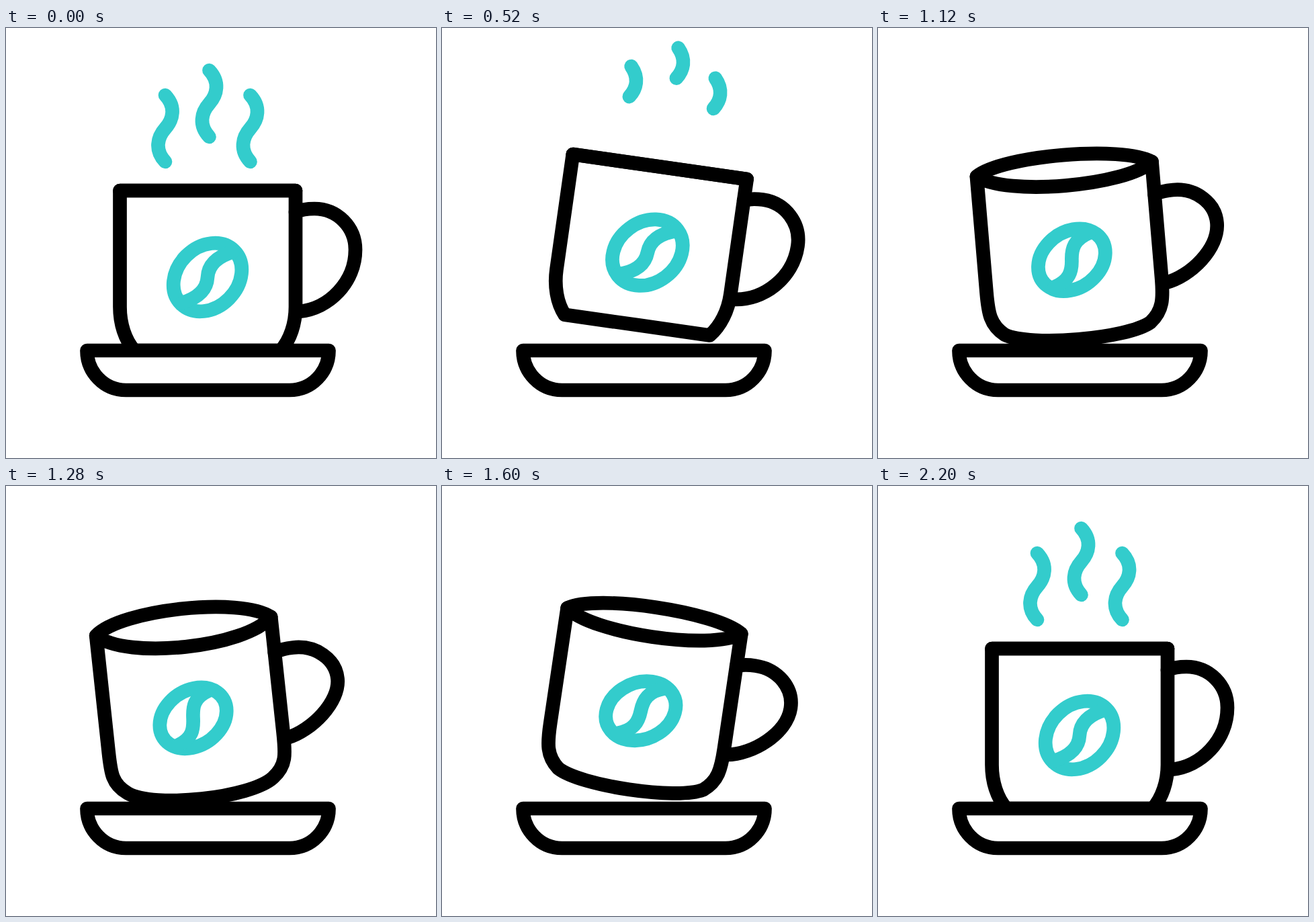
Animation, 640 px wide and 640 px high, one loop 2.4 s. Source, as an HTML page:

```html
<!DOCTYPE html>
<html lang="en">
<head>
<meta charset="utf-8">
<title>Coffee cup</title>
<style>
  html, body { margin: 0; width: 100%; height: 100%; overflow: hidden; background: #fff; }
  svg { display: block; width: 640px; height: 640px; }
  path, ellipse { fill: none; stroke: #000; stroke-width: 20.7; stroke-linecap: round; stroke-linejoin: round; }
  .teal { stroke: #3cc; }
  #squash * { vector-effect: non-scaling-stroke; }
  #saucer { fill: #fff; }
</style>
</head>
<body>
<svg viewBox="0 0 640 640">
  <clipPath id="above"><rect id="limit" width="640" height="640"/></clipPath>
  <g clip-path="url(#above)"><g id="steam"></g></g>
  <g id="cup">
    <g id="squash">
      <path id="handle"/>
      <ellipse class="teal" cx="300" cy="371" rx="56" ry="45" transform="rotate(-45 300 371)"/>
      <path id="crease" class="teal"/>
    </g>
    <path id="body"/>
    <path id="rim"/>
  </g>
  <path id="saucer" d="M120.5 480H480.5C480.5 512 455 539 422 539H178.5C146 539 120.5 512 120.5 480Z"/>
</svg>
<script>
const LOOP = 2400;
// time, rim centre x, rim centre y, tilt, rim depth, hop height on the way here
const POSES = [
  [200, 300, 242, 0, 0, 0],
  [500, 323.7, 206.7, 8.1, 0, 0],
  [830, 350.2, 206.2, 6.97, 0, 6],
  [1240, 258.2, 211, -7.85, 31, 0],
  [1480, 331.9, 182.9, 14.56, 27.8, 0],
  [1790, 284.2, 235.7, -3.5, 16.3, 0],
  [2200, 300, 242, 0, 0, 0]
];
const $ = id => document.getElementById(id);
const setPath = (id, d) => $(id).setAttribute("d", d);

const ease = (t, from, to) => {
  const u = Math.min(1, Math.max(0, (t - from) / (to - from)));
  return u * u * (3 - 2 * u);
};

const wisps = [[237, 100], [302.5, 63], [363.5, 100]].map(([x, y]) => {
  const p = document.createElementNS("http://www.w3.org/2000/svg", "path");
  p.setAttribute("class", "teal");
  p.setAttribute("pathLength", 1);
  p.setAttribute("d", `M${x} ${y}c16 17 12 36 0 49.5c-12 13.5 -16 32.5 0 49.5`);
  return $("steam").appendChild(p);
});

function poseAt(t) {
  let i = 1;
  while (i < POSES.length - 1 && t > POSES[i][0]) i++;
  const a = POSES[i - 1], b = POSES[i];
  const k = ease(t, a[0], b[0]);
  const [, x, y, tilt, depth] = a.map((v, n) => v + (b[n] - v) * k);
  return { x, y: y - b[5] * Math.sin(Math.PI * k), tilt, depth };
}

function drawCup({ x, y, tilt, depth }) {
  const move = `translate(${x} ${y}) rotate(${tilt}) translate(-300 -242)`;
  $("cup").setAttribute("transform", move);
  $("steam").setAttribute("transform", move);
  $("squash").setAttribute("transform", `translate(0 434) scale(1 ${1 - 0.0043 * depth}) translate(0 -434)`);

  // The deeper the rim, the rounder the cup and the steeper the crease.
  const front = 242 + depth * 4 / 3;
  const back = 242 - depth * 0.85 * 4 / 3;
  const base = 480 + depth * 0.66 * 4 / 3;
  const bulge = depth * 0.25;
  const turn = depth * 0.36;
  setPath("body",
    `M169.5 242C210 ${front} 390 ${front} 431 242V415C431 ${440 + bulge} ${423 + bulge} 464 409 480` +
    `C373 ${base} 227 ${base} 191 480C${177 - bulge} 464 169.5 ${440 + bulge} 169.5 415Z`);
  setPath("rim", `M169.5 242C210 ${back} 390 ${back} 431 242`);
  setPath("handle",
    `M431 274C440 270 450 269 459 269C493 269 520 296 520 330` +
    `C520 ${378 - bulge} ${481 - bulge} ${418 - bulge / 2} 436 422`);
  setPath("crease",
    `M${338 - turn} ${333 - turn / 2}C${315 - turn} ${340 - turn / 3} 301 352 300 371` +
    `C299 390 ${285 + turn} ${402 + turn / 3} ${262 + turn} ${409 + turn / 2}`);
}

function drawSteam(t) {
  const leaving = t < 1200;
  const part = leaving ? 1 - ease(t, 200, 800) : ease(t, 1640, 2200);
  for (const p of wisps) {
    p.style.display = part > 0 ? "" : "none";
    p.style.strokeDasharray = part < 1 ? `${part} 2` : "none";
    p.style.strokeDashoffset = leaving ? 0 : part - 1;
  }
  $("limit").setAttribute("height", leaving ? 640 : 206 + 4 * ease(t, 1780, 2200));
}

const start = performance.now();
function frame() {
  const t = (performance.now() - start) % LOOP;
  drawCup(poseAt(t));
  drawSteam(t);
  requestAnimationFrame(frame);
}
frame();
</script>
</body>
</html>
```
